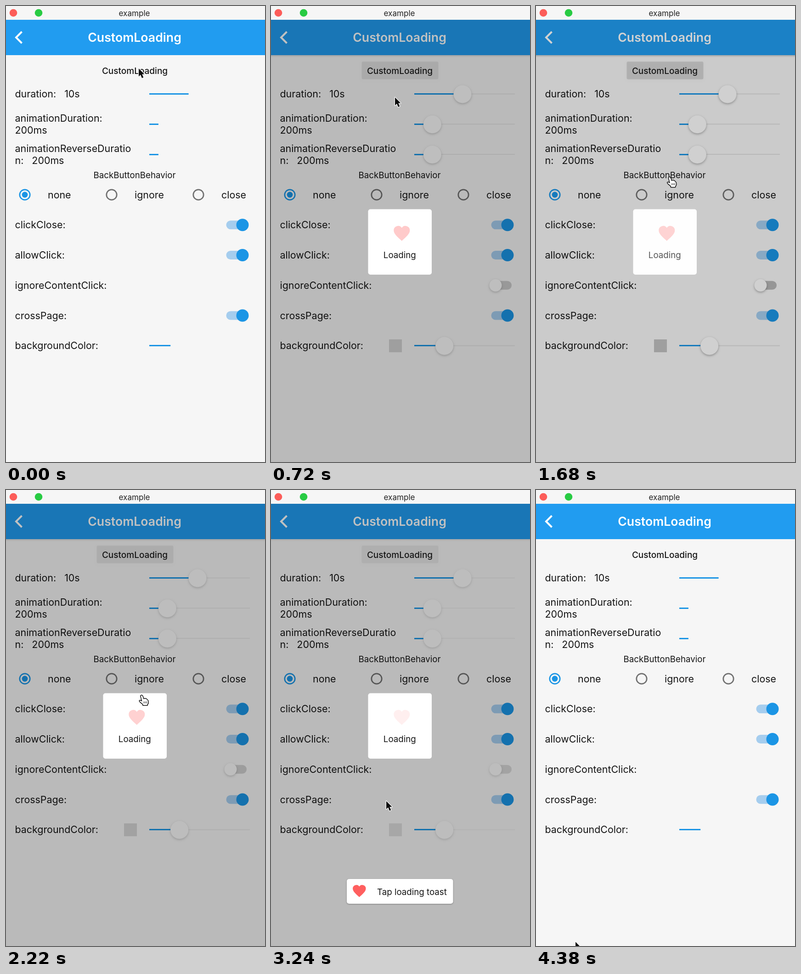
An HTML page with a canvas for the animation above (4.44 s loop, 564 by 993 pixels).

```html
<!DOCTYPE html>
<html lang="en">
<head>
<meta charset="utf-8">
<title>Custom loading</title>
<style>
html, body { margin: 0; width: 100%; height: 100%; overflow: hidden; background: #f6f6f6; }
canvas { display: block; width: 564px; height: 993px; }
</style>
</head>
<body>
<canvas id="stage" width="564" height="993"></canvas>
<script>
const ctx = document.getElementById('stage').getContext('2d');
const W = 564, H = 993, LOOP = 4440, STEP = 60;
const BLUE = '#1b95e5', INK = '#141414', BG = 246, VEIL = .243;

// timings in ms
const OPEN = 200, CLOSE = 125, PULSE = 560;
const SHOWS = [{ from: 244, to: 1075 }, { from: 1585, to: 3805 }];
const TOAST = { from: 2260, to: 3805 }, TAP = 3720;

// rows of the form share one pitch
const PITCH = 65.75, LEFT = 19.5;
const sliderRow = i => 191.5 + PITCH * i;
const optionRow = i => 411 + PITCH * i;

// pointer waypoints: time, x, y
const WAY = [
  [0, 289, 136], [720, 270, 199], [1200, 231, 240], [1560, 277, 150],
  [1680, 285, 372], [2760, 294, 521], [3840, 191, 896], [4380, 86, 984]
];

const heartPath = new Path2D('M12 21.3C6 16 2 12.3 2 8.5A5.5 5.5 0 0 1 12 5.1' +
  'A5.5 5.5 0 0 1 22 8.5C22 12.3 18 16 12 21.3Z');
const arrowPath = new Path2D('M0 0V17.5L4 13.8 7 21 10.3 19.6 7.3 12.6H12.5Z');
const handPath = new Path2D('M4 2Q6-1 8 3L10 9Q15 6 19.5 12.5L20 16Q20 19 18 20V22H9V20L3 15Q0 12 3 12L7 14Z');

const clamp = v => Math.max(0, Math.min(1, v));
const smooth = p => p * p * (3 - 2 * p);
const black = a => `rgba(0,0,0,${a})`;

// decelerating entry, and the same curve backwards on exit
function shown(t, { from, to }) {
  if (t < from) return 0;
  if (t < to) return 1 - (1 - clamp((t - from) / OPEN)) ** 2;
  return 1 - clamp((t - to) / CLOSE) ** 2;
}

function text(s, x, y, size = 21.4, weight = 400, color = INK, align = 'left') {
  ctx.font = `${weight} ${size}px Inter, Roboto, sans-serif`;
  ctx.textAlign = align;
  ctx.fillStyle = color;
  ctx.fillText(s, x, y);
}

function label(y, ...lines) {
  const first = y + 7.5 - 13 * (lines.length - 1);
  lines.forEach((s, i) => text(s, LEFT, first + 26 * i));
}

function rect(x, y, w, h, color, r = 0) {
  ctx.fillStyle = color;
  ctx.beginPath();
  ctx.roundRect(x, y, w, h, r);
  ctx.fill();
}

function disc(x, y, r, color) {
  ctx.fillStyle = color;
  ctx.beginPath();
  ctx.arc(x, y, r, 0, 7);
  ctx.fill();
}

function ring(x, y, r, color, width) {
  ctx.strokeStyle = color;
  ctx.lineWidth = width;
  ctx.beginPath();
  ctx.arc(x, y, r, 0, 7);
  ctx.stroke();
}

function shadow(blur, dy, alpha, draw) {
  ctx.save();
  ctx.shadowColor = black(alpha);
  ctx.shadowBlur = blur;
  ctx.shadowOffsetY = dy;
  draw();
  ctx.restore();
}

function heart(x, y, scale, color, alpha = 1) {
  ctx.save();
  ctx.globalAlpha *= alpha;
  ctx.translate(x, y);
  ctx.scale(scale, scale);
  ctx.translate(-12, -12.2);
  ctx.fillStyle = color;
  ctx.fill(heartPath);
  ctx.restore();
}

function titleBar() {
  rect(0, 0, W, 30, '#f6f6f6');
  text('example', 279.5, 21.5, 17.1, 400, '#222', 'center');
  disc(16, 15, 8.3, '#fc5d59');
  disc(71, 15, 8.3, '#28cb43');
}

function header() {
  rect(0, 30, W, 77, '#219cf0');
  ctx.strokeStyle = '#fff';
  ctx.lineWidth = 4;
  ctx.beginPath();
  ctx.moveTo(34.5, 56);
  ctx.lineTo(22, 68.5);
  ctx.lineTo(34.5, 81);
  ctx.stroke();
  text('CustomLoading', 280, 78, 26.7, 600, '#fff', 'center');
}

function radio(name, i) {
  const x = 41 + 189 * i, y = optionRow(0);
  ring(x, y, 11.2, i ? '#707070' : BLUE, 2.7);
  if (!i) disc(x, y, 6.4, BLUE);
  text(name, x + 50, y + 7.5);
}

function option(name, i) {
  const y = optionRow(i + 1);
  label(y, name);
  if (/ignore|Color/.test(name)) return;
  rect(479.5, y - 9.5, 44, 19, '#a5cdee', 9.5);
  disc(515, y, 13.5, BLUE);
}

function page() {
  rect(0, 0, W, H, '#f6f6f6');
  header();
  label(sliderRow(0), 'duration:   10s');
  label(sliderRow(1), 'animationDuration:', '200ms');
  label(sliderRow(2), 'animationReverseDuratio', 'n:   200ms');
  text('BackButtonBehavior', 280, 375, 18.7, 400, INK, 'center');
  ['none', 'ignore', 'close'].forEach(radio);
  ['clickClose:', 'allowClick:', 'ignoreContentClick:', 'crossPage:', 'backgroundColor:'].forEach(option);
}

function knob(x, y, r, g, dim) {
  const v = Math.round(BG * dim + 6 * g);
  shadow(5, 2, .35 * g, () => disc(x, y, r, `rgb(${v},${v},${v})`));
}

function slider(y, value, g, dim) {
  const x = 312 + 219 * value, top = Math.round(y - 1.5);
  rect(312, y - 1, 219, 2, black(.11 * g));
  rect(312, top, x - 331.5, 3, `rgb(${27 * dim},${149 * dim},${229 * dim})`);
  if (g) knob(x, y + .5, 19.5, g, dim);
}

// pale grey controls, of strength g, that only stand out under the veil
function controls(g, dim) {
  const shade = ctx.createLinearGradient(0, 107, 0, 112);
  shade.addColorStop(0, black(.2 * g));
  shade.addColorStop(1, black(0));
  rect(0, 107, W, 5, shade);
  if (g) shadow(4, 2, .3 * g, () => rect(197.5, 121, 167, 38.5, black(.13 * g), 3));
  rect(257, 726, 28, 28, black(.25 * g));
  rect(488, optionRow(3) - 9.5, 36, 19, black(.3 * g), 9.5);
  if (g) knob(489, optionRow(3), 13.5, g, dim);
  [.48, .18, .18].forEach((value, i) => slider(sliderRow(i), value, g, dim));
  slider(optionRow(5), .3, g, dim);
  text('CustomLoading', 280.5, 148, 19, 500, INK, 'center');
}

function card(k, age) {
  const phase = age / PULSE % 1;
  ctx.save();
  ctx.globalAlpha = Math.min(1, k * 1.35);
  rect(211.5, 442.5, 138.5, 142.5, '#fff', 5);
  ctx.globalAlpha = k;
  heart(284.8, 495.5, 1.75, '#ff5252', 1 - Math.abs(1 - 2 * phase));
  text('Loading', 280.3, 549, 18.7, 400, INK, 'center');
  ctx.restore();
}

function toast(k, t) {
  const body = [165, 847, 231.5, 54];
  ctx.save();
  ctx.globalAlpha = k;
  ctx.translate(0, 26 * (1 - k));
  shadow(3, 1, .35, () => rect(...body, '#fff', 5));
  if (t > TAP) {
    const r = 46 * (t - TAP) / 120;
    ring(195, 893, r * .93, 'rgba(255,255,255,.14)', 3);
    ctx.save();
    ctx.beginPath();
    ctx.roundRect(...body, 5);
    ctx.clip();
    disc(195, 888, r, '#e1e1e1');
    ctx.restore();
  }
  heart(192.3, 873.5, 1.42, '#ff5f5f');
  text('Tap loading toast', 231, 882, 18.7);
  ctx.restore();
}

function pointer(t) {
  const next = Math.max(1, WAY.findIndex(w => w[0] > t));
  const i = t < WAY.at(-1)[0] ? next : WAY.length - 1;
  const a = WAY[i - 1], b = WAY[i];
  const p = smooth(clamp((t - a[0]) / (b[0] - a[0])));
  const x = a[1] + (b[1] - a[1]) * p, y = a[2] + (b[2] - a[2]) * p;
  const hand = t < TOAST.from ? y > 360 : x > 165 && y > 850;

  ctx.save();
  ctx.translate(x, y);
  ctx.lineJoin = 'round';
  ctx.lineWidth = hand ? 3 : 2.4;
  ctx.strokeStyle = hand ? '#111' : '#fff';
  ctx.fillStyle = hand ? '#fff' : '#0c0c0c';
  const shape = hand ? handPath : arrowPath;
  ctx.stroke(shape);
  ctx.fill(shape);
  if (hand) for (let n = 0; n < 3; n++) rect(10.5 + 3 * n, 14, 1, 4, '#111');
  ctx.restore();
}

function draw(t) {
  const show = SHOWS.find(s => t >= s.from && t < s.to + CLOSE);
  const age = show ? t - show.from : 0;
  const k = show ? shown(t, show) : 0;
  const grey = Math.min(1, 2 * k) * (.4 + .6 * Math.exp(-age / 400));
  page();
  rect(0, 30, W, H - 30, black(VEIL * k));
  controls(grey, 1 - VEIL * k);
  titleBar();
  if (k) card(k, age);
  const rise = shown(t, TOAST);
  if (rise) toast(rise, t);
  pointer(t);
}

const start = performance.now();
function frame() {
  const t = (performance.now() - start) % LOOP;
  draw(Math.floor(t / STEP) * STEP);
  requestAnimationFrame(frame);
}
frame();
</script>
</body>
</html>
```
